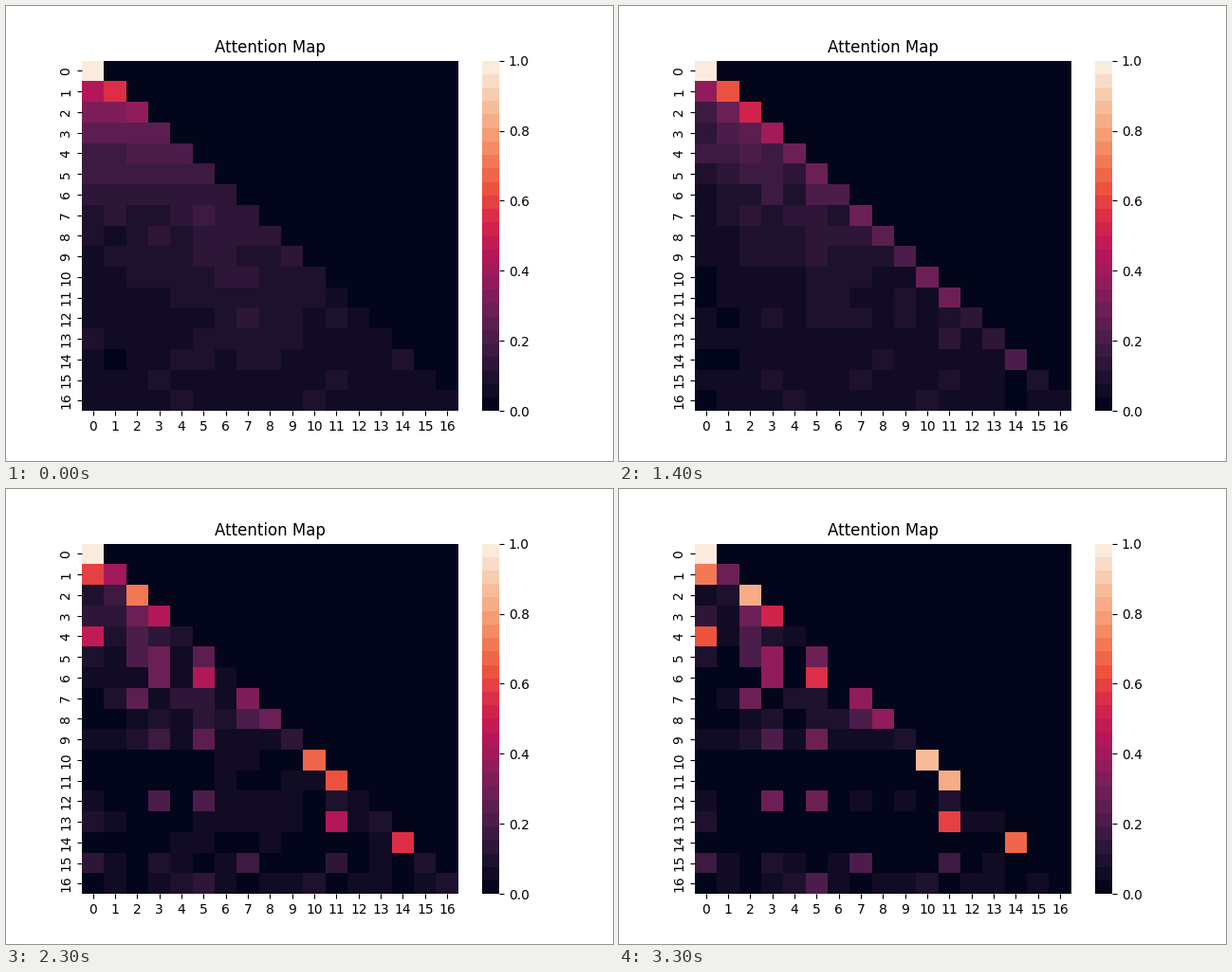
These frames come from a looping animation (640 by 480 pixels, 3400 ms). A matplotlib script:

```python
import numpy as np
import matplotlib.pyplot as plt
from matplotlib.animation import FuncAnimation
from matplotlib.colors import LinearSegmentedColormap

N = 17
FRAMES, STEP_MS = 34, 100
STOPS = ("#03051a #221331 #451c47 #691f55 #921c5b #b91657 #d92847 "
         "#ed503e #f47d57 #f6a47c #f7c9aa #faebdd").split()

# Links each row settles on: row -> {column: weight}
PEAKS = {
    0: {0: 1}, 1: {0: .70}, 2: {2: .84}, 3: {3: .50, 2: .29},
    4: {0: .62, 2: .22}, 5: {3: .36, 5: .29, 2: .22}, 6: {5: .54, 3: .36},
    7: {7: .37, 2: .28}, 8: {8: .36, 7: .22}, 9: {5: .29, 3: .22},
    10: {10: .88}, 11: {11: .82}, 12: {3: .29, 5: .29}, 13: {11: .60},
    14: {14: .68}, 15: {7: .21, 0: .16}, 16: {5: .20},
}

row, col = np.indices((N, N))
causal = col <= row
eye = np.eye(N)
rng = np.random.default_rng(4)
noise = rng.standard_normal((N, N))


def normalise(weights):
    return weights / np.maximum(weights.sum(axis=1, keepdims=True), 1e-9)


def smoothstep(t, start, end):
    x = np.clip((t - start) / (end - start), 0, 1)
    return x * x * (3 - 2 * x)


def settled():
    """Final weights: the peaks, with the rest spread unevenly."""
    a = np.zeros((N, N))
    for i, links in PEAKS.items():
        for j, weight in links.items():
            a[i, j] = weight
    rest = 1 - a.sum(axis=1, keepdims=True)
    return a + rest * normalise(causal * (a == 0) * np.exp(0.6 * noise))


# Nearly even start, a little stronger around the middle of the map
warmth = 0.6 * np.exp(-((row - 11) / 4) ** 2 - ((col - 6.5) / 3) ** 2)
lift = 0.2 * eye / np.maximum(row, 1)
even = causal * np.exp(warmth + lift + 0.015 * row * noise)
final = settled()


def attention(t):
    """Causal weights at t seconds; every row sums to one."""
    first_col = 1 - 0.4 * min(t, 1)
    early = normalise(np.where(col == 0, first_col, 1) * even)
    mix = smoothstep(t, 0.8, 3.1)
    a = (1 - mix) * early + mix * final
    # A passing pulse of self-attention travels down the diagonal
    pulse = 0.12 * np.exp(-((t - 1 - 0.06 * row) / 0.5) ** 2)
    return (1 - pulse) * a + pulse * eye


fig, ax = plt.subplots(figsize=(6.4, 4.8), dpi=100)
cmap = LinearSegmentedColormap.from_list("ramp", STOPS, N=26)
mesh = ax.pcolormesh(attention(0), cmap=cmap, vmin=0, vmax=1)
ax.set(xlim=(0, N), ylim=(N, 0), title="Attention Map")
ax.spines[:].set_visible(False)
ticks = np.arange(N) + 0.5
ax.set_xticks(ticks, range(N))
ax.set_yticks(ticks, range(N), rotation="vertical", va="center")
bar = fig.colorbar(mesh, ax=ax)
bar.outline.set_linewidth(0)


def update(n):
    mesh.set_array(attention(n * STEP_MS / 1000))
    return [mesh]


anim = FuncAnimation(fig, update, frames=FRAMES, interval=STEP_MS,
                     init_func=lambda: update(0), repeat=True, repeat_delay=0)
plt.show()
```
